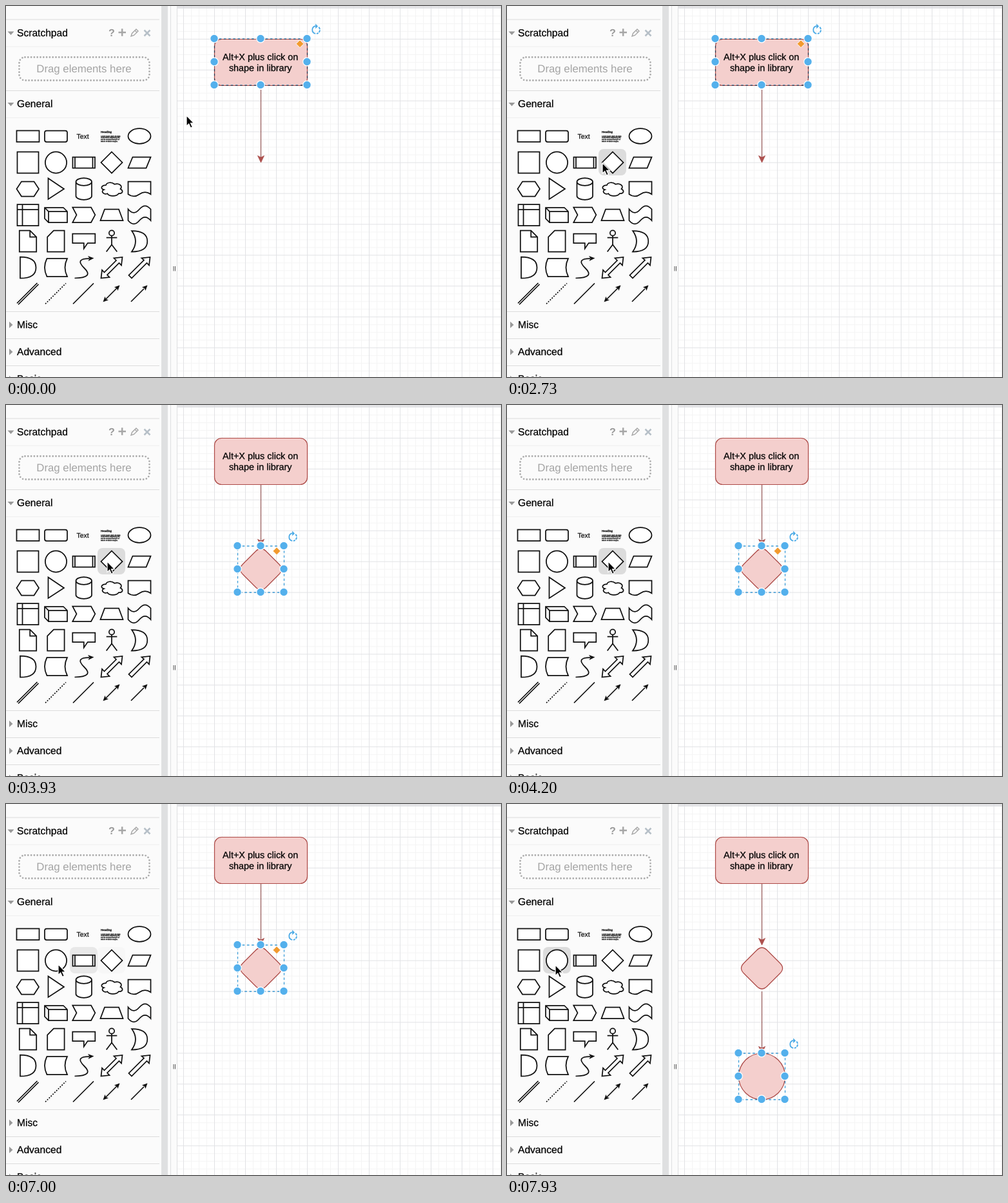
An HTML page that plays this animation: 768 by 576 pixels, repeating every 8 s.

```html
<!DOCTYPE html>
<html lang="en">
<head>
<meta charset="utf-8">
<title>Insert connected shapes</title>
<style>
  html, body { margin: 0; width: 100%; height: 100%; overflow: hidden; background: #fff; }
  svg { display: block; width: 100%; height: 100%; font-family: "Liberation Sans", Arial, sans-serif; }
  text { text-rendering: geometricPrecision; }
  .title, .label { stroke: #000; stroke-width: .25; }
  .title { font-size: 15.6px; }
  .label { font-size: 14.4px; text-anchor: middle; }
  .icons { fill: #fff; stroke: #111; stroke-width: 1.75; }
  .open { fill: none; }
  .solid { fill: #111; stroke: none; }
  .solid text { stroke: #111; stroke-width: .25; }
  .node { fill: #f4cfcd; stroke: #ac4946; stroke-width: 1.2; }
  .edge { fill: none; stroke: #935755; stroke-width: 1.2; }
  .head { fill: #ad504d; stroke: #ad504d; stroke-width: .8; }
  .frame { fill: none; stroke: #3fa3e0; stroke-width: 1.3; stroke-dasharray: 3.6; mix-blend-mode: multiply; }
  .handle { fill: #54b0ec; stroke: #fff; stroke-width: 1.2; }
</style>
</head>
<body>
<svg viewBox="0 0 768 576">
  <defs>
    <pattern id="grid" width="48" height="48" patternUnits="userSpaceOnUse" patternTransform="translate(35 3) scale(1 .9985)">
      <path d="M12.5 0V48M24.5 0V48M36.5 0V48M0 12.5H48M0 24.5H48M0 36.5H48" stroke="#f4f4f4"/>
      <path d="M.5 0V48M0 .5H48" stroke="#e1e2e5"/>
    </pattern>
    <g id="rotate" fill="none" stroke="#48a9e6" stroke-width="1.8">
      <path d="M-.8 -5.900A6 6 0 0 0 -.8 5.900"/>
      <path d="M4.250 -4.250A6 6 0 0 1 .8 5.900" stroke-dasharray="3.800 1.200"/>
      <path d="M-.8 -9.400L3 -5.500L-.8 -1.700Z" fill="#48a9e6" stroke="none"/>
    </g>
  </defs>

  <!-- canvas -->
  <rect x="265" width="503" height="576" fill="url(#grid)"/>
  <path d="M265 1.5H768" stroke="#d9dadd" stroke-width="2"/>

  <!-- sidebar -->
  <rect width="265" height="576" fill="#fbfbfb"/>
  <rect x="241" width="10" height="576" fill="#dfe0e1"/>
  <path d="M255.5 0V576M265.5 0V576" stroke="#dedfe1"/>
  <path d="M260 404V411.500M262.500 404V411.500" stroke="#555"/>
  <path d="M0 21H238M0 131.500H238M0 474.500H238M0 516.500H238M0 558.500H238" stroke="#dcdcdc" stroke-width="1.2"/>
  <path d="M0 63H238M0 173.500H238" stroke="#eee"/>
  <g fill="#999">
    <path d="M2.500 39.500H12.500L7.500 45ZM2.500 150H12.500L7.500 155.500ZM5 490V500L10.500 495ZM5 532V542L10.500 537ZM5 574V584L10.500 579Z"/>
    <text x="159" y="47" font-size="16" font-weight="bold">?</text>
  </g>
  <g class="title">
    <text x="17" y="47">Scratchpad</text>
    <text x="17" y="157">General</text>
    <text x="17" y="500">Misc</text>
    <text x="17" y="542">Advanced</text>
    <text x="17" y="584">Basic</text>
  </g>
  <g fill="none" stroke="#a6a6a6" stroke-width="2.500">
    <path d="M174.500 41H186M180.200 35.300V46.700"/>
    <path d="M194 47L195.500 42.500L202 36L205 39L198.500 45.500ZM200 38L203 41" stroke-width="1.400"/>
    <path d="M214.500 37.500L223.500 46.500M223.500 37.500L214.500 46.500" stroke="#b7c0c8"/>
    <rect x="20.500" y="79.500" width="202" height="36" rx="9" stroke="#adadad" stroke-width="2.800" stroke-linecap="round" stroke-dasharray="0 4.800"/>
  </g>
  <text x="121" y="103" font-size="16.8" fill="#a4a4a4" text-anchor="middle">Drag elements here</text>

  <g id="hovers" fill="#dcdcdc"></g>

  <g class="icons">
    <!-- row 1 -->
    <rect x="16.500" y="193.500" width="35" height="17.500"/>
    <rect x="60" y="193.500" width="35" height="17.500" rx="3"/>
    <g class="solid">
      <text x="119" y="205.500" font-size="10.400" text-anchor="middle">Text</text>
      <text x="147" y="197" font-size="4.300" font-weight="bold">Heading</text>
      <g font-size="2.500">
        <text x="147" y="202.500">Lorem ipsum dolor sit amet,</text>
        <text x="147" y="205.300">consectetur adipisicing elit,</text>
        <text x="147" y="208.100">sed do eiusmod tempor ut</text>
        <text x="147" y="210.900">labore et dolore magna.</text>
      </g>
    </g>
    <ellipse cx="207" cy="202" rx="17.500" ry="11.800"/>
    <!-- row 2 -->
    <rect x="17.500" y="226.500" width="33" height="33"/>
    <circle cx="77.500" cy="243" r="16.600"/>
    <path d="M103.500 234.500H138V251.500H103.500ZM107 234.500V251.500M134.500 234.500V251.500"/>
    <path d="M164 226.500L180.500 243L164 259.500L147.500 243Z"/>
    <path d="M189.500 251.500L196.500 234.500H224.500L217.500 251.500Z"/>
    <!-- row 3 -->
    <path d="M16.500 284L24 272.500H43.500L51 284L43.500 295.500H24Z"/>
    <path d="M65.500 267.500L90 284L65.500 300Z"/>
    <path d="M108.500 273A12.200 5.800 0 0 1 133 273V295A12.200 5.800 0 0 1 108.500 295ZM108.500 273A12.200 5.800 0 0 0 133 273"/>
    <path d="M155 278C147.800 278 146 284 151.800 285.200C146 287.800 152.500 293.600 157.200 291.200C160.400 296 171.200 296 174.800 291.200C182 291.200 182 286.400 177.500 284C182 279.200 174.800 274.400 168.500 276.800C164 273.200 156.800 273.200 155 278Z"/>
    <path d="M189.500 272.500H224.500V292.200Q215.700 285.900 207 292.200T189.500 292.200Z"/>
    <!-- row 4 -->
    <path d="M17.500 308H50.500V341H17.500ZM25.500 308V341M17.500 316H50.500"/>
    <path d="M60 313H89L95 319V336H66L60 330ZM60 313L66 319H95M66 319V336"/>
    <path d="M103.300 312.700H132L138.300 324.300L132 336H103.300L109.500 324.300Z"/>
    <path d="M146.500 333L153 315.700H175L181.500 333Z"/>
    <path d="M189.500 315.500Q198.300 326 207 315.500T224.500 315.500V333Q215.700 322.500 207 333T189.500 333Z"/>
    <!-- row 5 -->
    <path d="M20.800 348.700H37.200L47.200 358.700V381.500H20.800ZM37.200 348.700V358.700H47.200"/>
    <path d="M74 348.700H90.600V381.500H64.200V358.700Z"/>
    <path d="M103.300 353.500H138.300V368H126.700L120.800 376.700V368H103.300Z"/>
    <path class="open" d="M164 356.700V370.500M155.700 359.700H172.300M164 370.500L155.700 381.600M164 370.500L172.300 381.600"/>
    <circle cx="164" cy="352.500" r="4.100"/>
    <path d="M195 349Q219.300 349 219.300 365.300T195 381.500Q207 365.300 195 349Z"/>
    <!-- row 6 -->
    <path d="M22 389.700Q46.500 389.700 46.500 406.200T22 422.700Z"/>
    <path d="M63.500 392H95Q88 406 95 420H63.500Q56.500 406 63.500 392Z"/>
    <path class="open" d="M106.500 422.500Q137 422 121.500 407T129 392"/>
    <path class="solid" d="M136.500 391.500L127.500 396L129.500 392L127 388Z"/>
    <path d="M180.500 390L179 402.500L175.500 399L157 417.500L160.500 421L147.500 422.500L149 410L152.500 413.500L171 395L167.500 391.500Z"/>
    <path d="M223.500 390L222 402.500L218.500 399L195 422.500L190.500 418L214 394.500L210.500 391.500Z"/>
    <!-- row 7 -->
    <path class="open" d="M17 461.500L48.500 430M19 463.500L50.500 432M104 462.500L136 430.500M155 455L172 438M194 459L214 439"/>
    <path class="open" d="M61 462.500L93 430.500" stroke-dasharray="2 2"/>
    <path class="solid" d="M176.500 433.500L173.500 442L172 438.500L168 436.500ZM150.500 459.500L153.500 451L155 455L159 456.500ZM219.500 433.500L216.500 442L215 438.500L211 436.500Z"/>
  </g>

  <!-- diagram -->
  <rect class="node" x="323.500" y="51.500" width="144" height="72" rx="11"/>
  <text class="label" x="394.700" y="84">Alt+X plus click on</text>
  <text class="label" x="394.700" y="101">shape in library</text>
  <g id="edges"></g>
  <path id="diamond" class="node" d="M387.500 227Q395.500 219 403.500 227L423.500 247Q431.500 255 423.500 263L403.500 283Q395.500 291 387.500 283L367.500 263Q359.500 255 367.500 247Z"/>
  <circle id="circle" class="node" cx="395.500" cy="423" r="36"/>
  <g id="selections"></g>
  <path id="cursor" d="M0 0V16.400L3.700 13L6.500 19.300L9.300 18.100L6.500 11.900H11.500Z" stroke="#fff" stroke-width="1.200"/>
</svg>
<script>
const LOOP = 8000, STEP = 1000 / 15, FADE = 200;
const ADD_DIAMOND = 3930, ADD_CIRCLE = 7600;
const $ = id => document.getElementById(id);
const clamp = v => Math.max(0, Math.min(1, v));

// [time, x, y] of the pointer tip
const path = [
  [2430, 280, 170], [2530, 220, 205], [2620, 160, 239], [2733, 148, 243.5], [2950, 154, 243], [3200, 157, 243],
  [6730, 157, 243], [6830, 143, 246], [6930, 112, 248], [7000, 81, 249], [7250, 75, 250]
];
// [left edge, enter, leave]
const hovers = [[142, 2500, 6830], [99, 6880, 7000], [56, 7000, Infinity]];

const edge = (from, tip) =>
  `<g><path class="edge" d="M395.5 ${from}V${tip - 8}"/>` +
  `<path class="head" d="M395.5 ${tip}l-5 -10.500l5 2.600l5 -2.600Z"/></g>`;

function selection(x, y, w, h, corner) {
  let s = `<g><rect class="frame" x="${x + .5}" y="${y + .5}" width="${w}" height="${h}"/>`;
  for (const i of [0, .5, 1]) for (const j of [0, .5, 1])
    if (i !== .5 || j !== .5) s += `<circle class="handle" cx="${x + i * w}" cy="${y + j * h}" r="6.300"/>`;
  if (corner) s += `<path d="M${x + w - 11} ${y + 2.2}l6 6l-6 6l-6 -6Z" fill="#f29a2e" stroke="#fff"/>`;
  return s + `<use href="#rotate" x="${x + w + 14}" y="${y - 13.5}"/></g>`;
}

$('edges').innerHTML = edge(130, 243) + edge(124, 219) + edge(291, 387);
$('selections').innerHTML = selection(323, 50.5, 144, 72, true) +
  selection(359, 218.5, 72, 72, true) + selection(359, 386.5, 72, 72, false);
$('hovers').innerHTML = hovers.map(h => `<rect x="${h[0]}" y="222" width="43" height="41" rx="8"/>`).join('');

const show = (el, on) => el.style.display = on ? '' : 'none';

function pointer(t) {
  const i = path.findIndex(p => p[0] > t);
  if (i === 0) return path[0].slice(1);
  if (i < 0) return path[path.length - 1].slice(1);
  const [a, b] = [path[i - 1], path[i]], k = (t - a[0]) / (b[0] - a[0]);
  return [1, 2].map(n => a[n] + (b[n] - a[n]) * k);
}

function draw(now) {
  const t = Math.floor((now % LOOP + 4) / STEP) * STEP;
  const stage = t < ADD_DIAMOND ? 0 : t < ADD_CIRCLE ? 1 : 2;

  $('cursor').setAttribute('transform', `translate(${pointer(t)})`);
  hovers.forEach(([, enter, leave], i) => {
    const reached = clamp((Math.min(t, leave) - enter) / FADE);
    const lost = Math.max(0, t - leave) / FADE;
    $('hovers').children[i].setAttribute('opacity', clamp(reached - lost));
  });

  [...$('selections').children].forEach((el, i) => show(el, i === stage));
  const [loose, first, second] = $('edges').children;
  show(loose, stage === 0);
  show(first, stage > 0);
  show(second, stage === 2);
  show($('diamond'), stage > 0);
  show($('circle'), stage === 2);
}

const start = performance.now();
function tick() {
  draw(performance.now() - start);
  requestAnimationFrame(tick);
}
tick();
</script>
</body>
</html>
```
